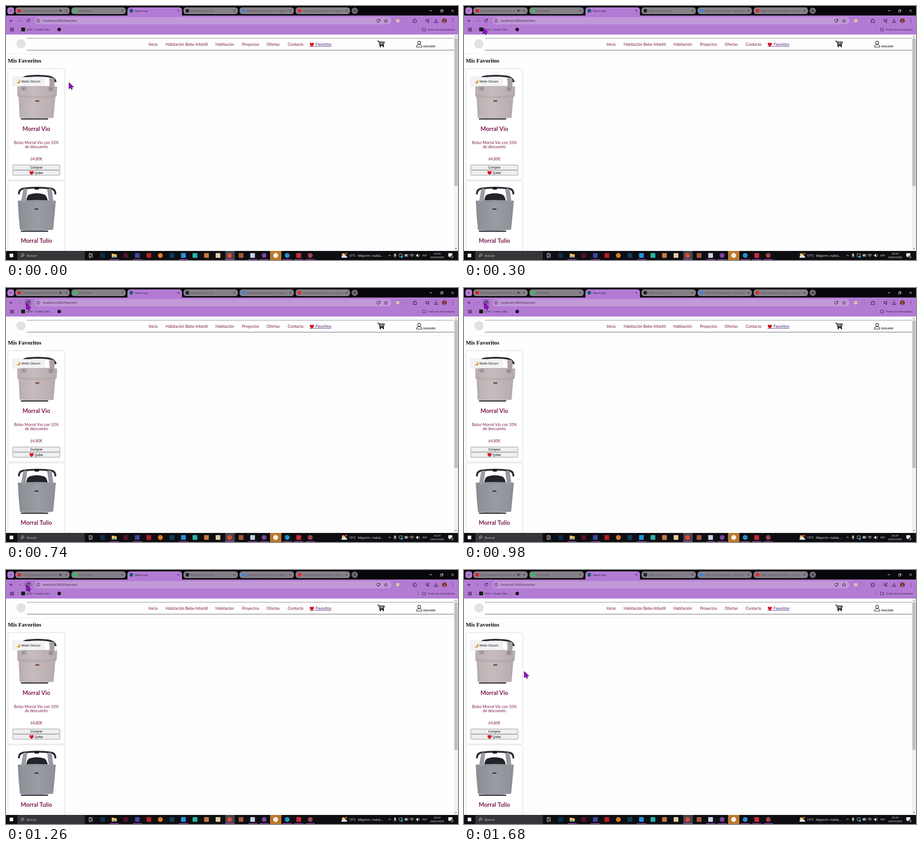
Recreate the animation shown at these times as an HTML page with a canvas. Size 998 by 561 pixels, loop 1.7 s.

```html
<!DOCTYPE html>
<html lang="es">
<head>
<meta charset="utf-8">
<title>Mis Favoritos</title>
<style>
html, body { margin: 0; width: 100%; height: 100%; overflow: hidden; background: #fefefe; }
canvas { display: block; width: 998px; height: 561px; }
</style>
</head>
<body>
<canvas id="stage" width="998" height="561"></canvas>
<script>
const stage = document.getElementById('stage');
const base = document.createElement('canvas');
base.width = 998;
base.height = 561;
let g = base.getContext('2d');

const LOOP = 1700;
const UI = '"Open Sans", "Noto Sans", sans-serif';
const PAGE = 'Lato, "Open Sans", sans-serif';
const ARIAL = '"Liberation Sans", Arial, sans-serif';
const WINE = '#7b1c4c';
const INK = '#2b1738';
const PURPLE = '#b37bd4';

function rect(x, y, w, h, fill, r = 0) {
  g.fillStyle = fill;
  g.beginPath();
  g.roundRect(x, y, w, h, r);
  g.fill();
}

function frame(x, y, w, h, color, r = 0, lw = 1) {
  g.strokeStyle = color;
  g.lineWidth = lw;
  g.beginPath();
  g.roundRect(x, y, w, h, r);
  g.stroke();
}

function dot(x, y, r, fill) {
  g.fillStyle = fill;
  g.beginPath();
  g.arc(x, y, r, 0, 7);
  g.fill();
}

function ring(x, y, r, color, lw = 1, from = 0, to = 6.3) {
  g.strokeStyle = color;
  g.lineWidth = lw;
  g.beginPath();
  g.arc(x, y, r, from, to);
  g.stroke();
}

function line(d, color, lw = 1, x = 0, y = 0) {
  g.save();
  g.translate(x, y);
  g.strokeStyle = color;
  g.lineWidth = lw;
  g.stroke(new Path2D(d));
  g.restore();
}

function shape(d, fill, x = 0, y = 0) {
  g.save();
  g.translate(x, y);
  g.fillStyle = fill;
  g.fill(new Path2D(d));
  g.restore();
}

function text(s, x, y, size, color, font = UI, align = 'left', weight = 400) {
  g.font = `${weight} ${size}px ${font}`;
  g.fillStyle = color;
  g.textAlign = align;
  g.fillText(s, x, y);
}

function clipped(s, x, y, width, size, color) {
  g.save();
  g.beginPath();
  g.rect(x, y - 10, width, 14);
  g.clip();
  text(s, x, y, size, color);
  g.restore();
}

function heart(x, y) {
  shape('M0 4.6C-6 .8-5.4-4-2.6-4-1-4 0-2.6 0-2.2 0-2.6 1-4 2.6-4 5.4-4 6 .8 0 4.6Z', '#d81424', x, y);
}

function cross(x, y, s, color) {
  line(`M${-s} ${-s}L${s} ${s}M${s} ${-s}L${-s} ${s}`, color, 0.9, x, y);
}

function drawTabs() {
  rect(0, 0, 998, 24, '#08060a');
  rect(3, 3, 15, 15, PURPLE, 5);
  line('M-2-1L0 1 2-1', '#1c1024', 1, 10.5, 10.5);

  const tabs = [
    ['The Nubelarium 3 Orom & S', '#e0202c', 74],
    ['PlumChat', '#31c05a', 80],
    ['React App', '#17606e', 80],
    ['Boletín Sprint 2.2', '#25222a', 90],
    ['Boletín de Ejercicios - T2 Sprint', '#3f82e8', 86],
    ['Descarga tus archivos — Com...', '#e02b2b', 88]
  ];
  tabs.forEach(([label, color, width], i) => {
    const x = 20.5 + i * 123.8;
    const on = i === 2;
    if (on) rect(x, 3, 120.5, 24, PURPLE, 6);
    else rect(x, 3, 120, 15, '#858087', 6);
    if (i === 0 || i === 4) rect(x + 4.5, 7, 8, 7, color, 1.5);
    else dot(x + 8.5, 10.5, 4.2, color);
    clipped(label, x + 17, 13, width, 6.1, on ? INK : '#514a55');
    cross(x + 112.5, 10.5, 2, on ? INK : '#332c37');
  });
  shape('M-3-1.3H-1.5L.8-3V3L-1.5 1.3H-3Z', '#332c37', 120.5, 10.5);
  ring(120.5, 10.5, 2.8, '#332c37', 0.7, -0.8, 0.8);

  dot(770, 10.5, 7, '#6f6975');
  line('M-3 0H3M0-3V3', '#17131a', 0.9, 770, 10.5);
  line('M935.5 10.5H941', '#eee', 1);
  frame(959.5, 9.5, 4, 4, '#eee', 0, 0.8);
  line('M961 9V8H965V12H964', '#eee', 0.8);
  cross(986, 10.5, 2.6, '#eee');
}

function drawToolbar() {
  rect(0, 21, 998, 42, PURPLE);
  rect(63, 24.5, 788, 16, '#c299d8', 8);

  line('M3 0H-3M0-3L-3 0 0 3', INK, 1, 11.5, 32.5);
  line('M-3 0H3M0-3L3 0 0 3', '#94629f', 1, 30, 32.5);
  ring(71, 32.5, 3.6, INK, 0.8);
  line('M71 32V34.6M71 30.3V31.2', INK, 0.9);
  text('localhost:3000/favorites', 81, 35, 6.8, '#3b2549');

  frame(818.5, 29.5, 7, 5, INK, 0.8, 0.8);
  line('M820 36.2H824M825 28V32M823.4 30.6L825 32.2 826.6 30.6', INK, 0.8);
  line('M0-4L1.2-1.3 4-1.2 1.8.7 2.6 3.5 0 1.9-2.6 3.5-1.8.7-4-1.2-1.2-1.3Z', INK, 0.8, 839, 32.7);
  rect(861.5, 29, 7, 7, '#ddc6a5', 1);
  rect(880.5, 29.5, 7, 7, '#ab7cc6', 1);
  line('M-3.5-2.5H-1Q-1-4.5.5-4.5T2-2.5H3.5V3.5H-3.5V1.5Q-1.5 1-1.5 0T-3.5-1Z', INK, 1, 902.5, 33);
  line('M926.5 30H931M926.5 32H931M926.5 34H929M933 35V29H935', INK, 1);
  dot(932, 35, 1.5, INK);
  line('M949.5 28V34M947 31.7L949.5 34.2 952 31.7M945.7 34V36.5H953.3V34', INK, 1);
  dot(968, 32.5, 5.2, '#692b2e');
  dot(968, 31, 1.8, '#b5705a');
  shape('M-3.3 4Q0-1 3.3 4Q0 6-3.3 4Z', '#b5705a', 968, 32);
  [29.5, 32.5, 35.5].forEach(y => dot(986.5, y, 0.8, INK));

  for (let i = 0; i < 9; i++) {
    frame(9.8 + (i % 3) * 2.8, 48.6 + (i / 3 | 0) * 2.8, 1.5, 1.5, INK, 0, 0.7);
  }
  line('M26.5 48V56', '#8d5ca5', 0.8);
  rect(33.5, 47.5, 8.5, 8.5, '#14200d', 1);
  text('QIVO - Create, Edit...', 45, 54, 5.8, INK);
  dot(117.5, 51.8, 3.9, '#170e1d');
  line('M909.5 47V56', '#8d5ca5', 0.8);
  line('M919.5 54.8V49H922.5L923.5 50H926.5V54.8Z', INK, 0.8);
  text('Todos los marcadores', 931, 54, 5.9, INK);
}

function drawHeader() {
  rect(0, 63, 998, 478, '#fefefe');
  rect(0, 105.5, 989, 1, '#ececec');
  rect(46, 70.7, 943, 0.9, '#626067');
  rect(46, 97.1, 943, 0.9, '#626067');
  dot(33, 83.5, 10.2, '#e2e2e4');

  const links = [
    ['Inicio', 325], ['Habitación Bebe-Infantil', 399], ['Habitación', 483],
    ['Proyectos', 540], ['Ofertas', 590], ['Contacto', 639.5]
  ];
  links.forEach(([label, x]) => text(label, x, 88, 8.7, WINE, PAGE, 'center'));
  heart(675.3, 85);
  text('Favoritos', 701, 88, 8.7, '#4b216f', PAGE, 'center');
  rect(670, 89, 48, 0.8, '#4b216f');

  line('M820 77.5H823L825.5 87H834.5M823.5 79.5H835.5L833.5 85.5H825', '#0b0b0b', 1.3);
  line('M824.3 82.3H834.7M827 79.5L828 85.5M831.8 79.5L831.3 85.5', '#0b0b0b', 0.9);
  dot(826.5, 89.3, 1.6, '#0b0b0b');
  dot(833, 89.3, 1.6, '#0b0b0b');
  ring(912.3, 81.2, 3.3, '#191919', 1.1);
  line('M906.5 90.7Q906.5 85.2 912.3 85.2T918.1 90.7Z', '#191919', 1.1);
  text('Iniciar sesión', 921.3, 89.5, 4.6, '#111', ARIAL);
  rect(921, 90, 27, 0.6, '#111');

  text('Mis Favoritos', 4, 124.5, 12.5, '#0b0b0b', '"Liberation Serif", Times, serif', 'left', 700);

  rect(989, 63, 9, 478, '#f1f1f1');
  rect(990, 71.5, 7, 326, '#bfbfc1');
  shape('M-2 1L0-1.5 2 1Z', '#777', 993.5, 67.5);
  shape('M-2-1L0 1.5 2-1Z', '#555', 993.5, 536);
}

function card(y, h) {
  g.save();
  g.shadowColor = 'rgba(0,0,0,.14)';
  g.shadowBlur = 2;
  rect(4.5, y, 125, h, '#fff', 3);
  g.restore();
  frame(4.5, y, 125, h, '#dcdcdf', 3, 0.9);
}

function button(y, label, x) {
  rect(15, y, 104, 11, '#efeff0', 1.5);
  frame(15, y, 104, 11, '#77777b', 1.5, 0.8);
  text(label, x, y + 7.9, 6.93, '#080808', ARIAL, 'center');
}

function drawLightBag() {
  line('M35 166Q36 157 47 155.5Q70 152.5 93 155.5Q107 157.5 110 168', '#2b2c34', 4);
  line('M33 249.5H93', '#25232a', 2.4);
  const cloth = g.createLinearGradient(25, 0, 113, 0);
  cloth.addColorStop(0, '#b9aeb0');
  cloth.addColorStop(0.4, '#c6bcbd');
  cloth.addColorStop(1, '#b6abae');
  shape('M25 178Q68 174 113 178L112 199 109 201 105 247Q68 249.5 30 247L28 203 25 198Z', cloth);
  line('M26 197Q68 203 112 197M28 200Q68 206 110 200', '#9d9397', 0.7);
  line('M31 206L34 245M105 206L102 245', '#aba1a4', 0.8);
  shape('M95 161Q100 156 106 160Q109 166 105 188H94Q98 172 95 161Z', '#aaa1a5');
  rect(33, 178, 12, 9, '#aba2a5', 1);
  rect(94, 179, 10, 9, '#a0979b', 1);
  dot(39, 182.5, 1.4, '#736c72');
  dot(99, 183.5, 1.4, '#736c72');
  rect(65, 208.5, 8.5, 2.6, '#702e32');
}

function drawGreyBag() {
  line('M28.5 416Q28 406 37 403.5Q69 399 101 403.5Q109.5 406 109 416', '#2b2c33', 4);
  rect(63, 400, 10, 5.5, '#17181c', 2);
  shape('M45 431Q45 419 52 416Q68 411 84 416Q91 419 92 431Z', '#23242a');
  line('M33 497.5H93', '#26262b', 2.4);
  const cloth = g.createLinearGradient(26, 0, 111, 0);
  cloth.addColorStop(0, '#8a8e95');
  cloth.addColorStop(0.5, '#999da3');
  cloth.addColorStop(1, '#8d9097');
  shape('M26 430Q68 427 110 430L107 465 104 494Q68 498 31 495L28 465Z', cloth);
  line('M27 433Q68 430 109 433M30 440L34 492M106 440L102 491', '#7d8188', 0.7);
  shape('M38 405Q43 401 47 405L43 434H33Z', '#9a9da2');
  shape('M91 405Q96 401 101 405L105 434H95Z', '#96999f');
  rect(63, 447.3, 8.5, 2.6, '#3b2d31');
}

function drawCards() {
  card(138.5, 245.5);
  drawLightBag();
  g.save();
  g.shadowColor = 'rgba(0,0,0,.3)';
  g.shadowBlur = 2;
  rect(15, 157, 69, 20, '#f2f2f5', 2);
  g.restore();
  shape('M1-4.5A4.5 4.5 0 1 1-4.3 1.4 4.2 4.2 0 0 0 1-4.5Z', '#dba52f', 27.5, 167);
  text('Modo Oscuro', 34.2, 169.4, 6.93, '#171717', ARIAL);

  text('Morral Vio', 67, 275.5, 12.8, WINE, PAGE, 'center', 700);
  text('Bolso Morral Vio con 10%', 67, 304.5, 8.6, WINE, PAGE, 'center');
  text('de descuento', 67, 314.3, 8.6, WINE, PAGE, 'center');
  text('64,80€', 67, 341, 8.5, WINE, PAGE, 'center');
  button(351.2, 'Comprar', 67);
  button(362.8, 'Quitar', 72.5);
  heart(56.5, 368.5);

  card(386.5, 190);
  drawGreyBag();
  text('Morral Tulio', 67, 523, 12.8, WINE, PAGE, 'center', 700);
}

function drawTaskbar() {
  rect(0, 541, 998, 20, '#0e0e12');
  rect(8, 547, 8, 8, '#f5f5f5');
  rect(25, 541.5, 149, 19.5, '#36363a');
  ring(37, 550, 2.6, '#e8e8e8', 0.9);
  line('M35 552L32.3 554.7', '#e8e8e8', 0.9);
  text('Buscar', 45.5, 553.5, 7.2, '#c7c7c9');
  frame(183.5, 548.5, 4.5, 5, '#f2f2f2', 0, 0.9);
  line('M183 546.5H188.5M183 555.7H188.5M190.5 546V556', '#f2f2f2', 0.9);

  rect(484, 541, 21, 20, '#45454a');
  rect(583, 541, 25, 20, '#bb792e');
  const apps = ['#08304f', '#f0c45a', '#56102d', '#3e479c', '#b51f24', '#d87b24',
    '#123c58', '#2494da', '#25b5a5', '#c57845', '#dfcda3', '#d84b3b', '#a5573e',
    '#c4d2e3', '#7a459d', '#f4f0e8', '#258fc9', '#cb2b3b', '#99434c'];
  const round = [5, 11, 14, 15, 16, 18];
  apps.forEach((color, i) => {
    const x = 213.5 + i * 25.46;
    if (i === 1) {
      shape('M-5.5-4H-1L0-2.7H5.5V4.5H-5.5Z', color, x, 551);
      rect(x - 3, 552.5, 6, 3, '#4d93d0');
    } else if (round.includes(i)) {
      dot(x, 551, 5.4, color);
    } else {
      rect(x - 5.2, 545.8, 10.4, 10.4, color, 1);
    }
  });
  [239, 290, 392, 494, 545, 570, 621, 646, 672].forEach(x => {
    rect(x - 10, 559.5, 20, 1.5, '#9a43b5');
  });

  dot(745, 549.5, 3.5, '#eeb443');
  shape('M-6 4Q-7 0-3.5-.5Q-2-4 1-2Q4-2.5 4.3.5Q7 1 6 4Z', '#d8e0e9', 747, 552);
  dot(751, 547, 2.2, '#d33d3b');
  text('15°C', 757, 553.5, 7, '#f3f3f3');
  text('Mayorm. nubla...', 777, 553.5, 7, '#f3f3f3');

  const white = '#e9e9e9';
  line('M-2.8 1.3L0-1.5 2.8 1.3', white, 1, 847, 551);
  rect(857.5, 546.5, 3, 5.5, white, 1.5);
  line('M856 550.5Q856 553.5 859 553.5T862 550.5M859 553.5V556', white, 0.8);
  frame(868, 547.5, 7, 6, white, 0.5, 0.8);
  dot(874, 554, 2.4, '#2f9ad2');
  frame(880.5, 548.5, 7, 4.5, white, 0.5, 0.8);
  rect(881.5, 549.5, 4, 2.5, white);
  for (let i = 1; i < 4; i++) ring(896, 555, i * 2.3, white, 0.9, -2.3, -0.8);
  shape('M-3.5-1.5H-2L1-4V4L-2 1.5H-3.5Z', white, 909, 551);
  ring(909, 551, 4, white, 0.8, -0.8, 0.8);
  text('ESP', 924.5, 553.3, 5.8, '#f3f3f3', UI, 'center');
  text('20:24', 952, 548.6, 5.8, '#f3f3f3', UI, 'center');
  text('26/02/2025', 952, 557.4, 5.8, '#f3f3f3', UI, 'center');
  shape('M-4.5-4.5H4.5V3H1L-1.5 5V3H-4.5Z', white, 981, 550.5);
  dot(985.3, 554.3, 3.5, '#343438');
  text('2', 985.3, 556.3, 5.4, '#fff', UI, 'center');
}

drawTabs();
drawToolbar();
drawHeader();
drawCards();
drawTaskbar();

g = stage.getContext('2d');

// Pointer stops: time, x, y
const stops = [
  [0, 139, 169], [260, 42, 49], [300, 42, 48], [520, 43, 41],
  [800, 45, 33], [1560, 45, 33], [1680, 133, 224], [LOOP, 133, 224]
];

function pointerAt(t) {
  const i = stops.findIndex((s, n) => n > 0 && t <= s[0]);
  const [t0, x0, y0] = stops[i - 1];
  const [t1, x1, y1] = stops[i];
  const u = (t - t0) / (t1 - t0);
  const k = u * u * (3 - 2 * u);
  return [x0 + (x1 - x0) * k, y0 + (y1 - y0) * k];
}

function drawReload(hover) {
  if (hover) dot(48.7, 32.5, 8, 'rgba(65,25,85,.24)');
  ring(48.7, 32.6, 3, INK, 1, 0.3, 5.5);
  shape('M.4-.4H3.9V-3.9Z', INK, 48.4, 31.9);
}

function drawPointer(x, y) {
  const d = 'M0 0V14L3.4 11.2 5.5 15.6 7.7 14.5 5.8 10.3 10.5 10Z';
  shape(d, '#9b08d2', x, y);
  line(d, '#2c0540', 0.8, x, y);
}

function render(now) {
  const [x, y] = pointerAt(now % LOOP);
  g.drawImage(base, 0, 0);
  drawReload(Math.hypot(x - 48.7, y - 32.5) < 8);
  drawPointer(x, y);
  requestAnimationFrame(render);
}

render(0);
</script>
</body>
</html>
```
